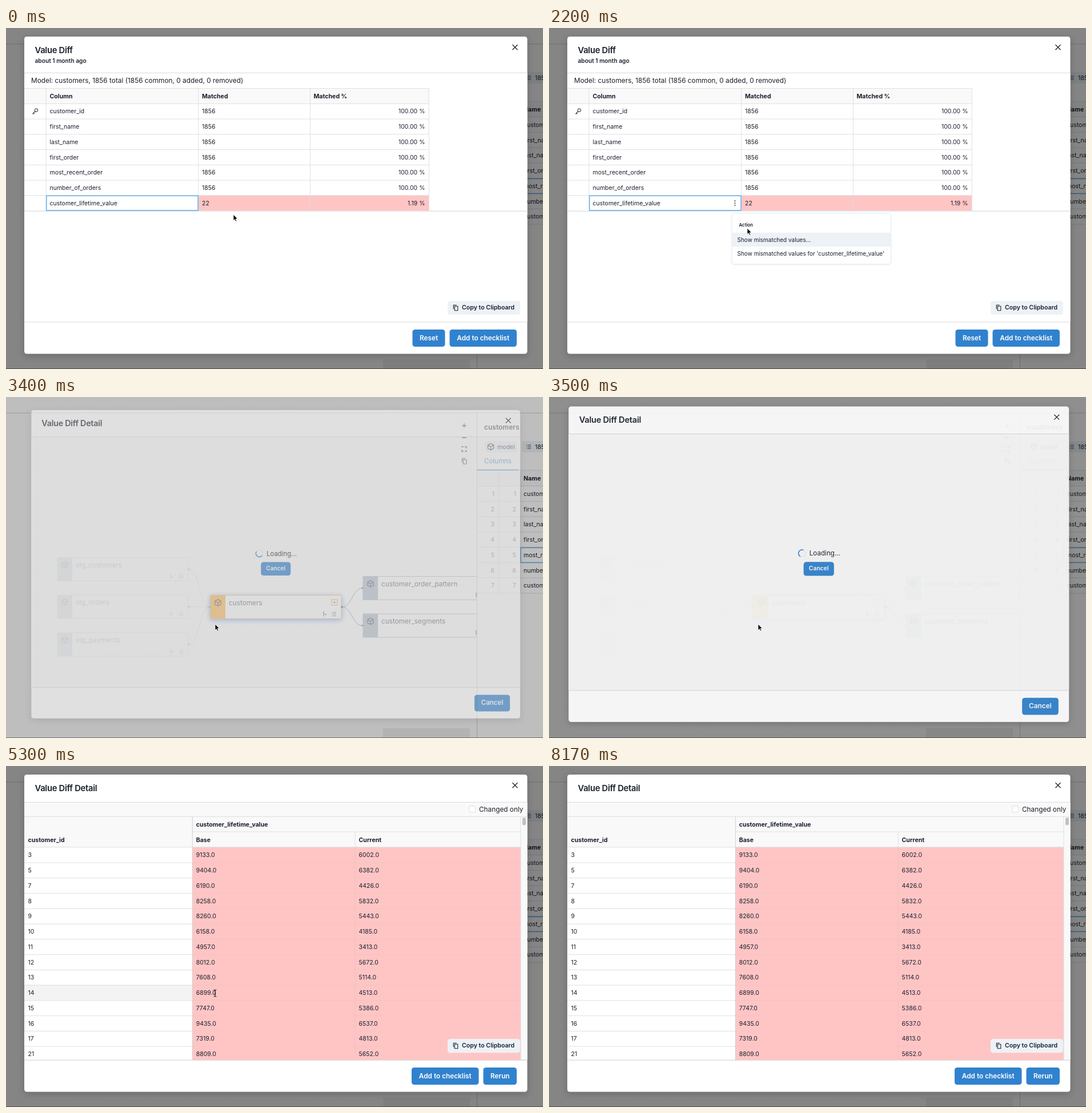
Recreate the animation shown at these times as an HTML page. Size 940 by 596 pixels, loop 8340 ms.

```html
<!DOCTYPE html>
<html lang="en">
<head>
<meta charset="utf-8">
<title>Value Diff</title>
<style>
  html, body { margin: 0; width: 100%; height: 100%; overflow: hidden; background: #fff; }
  svg { display: block; width: 940px; height: 596px; font-family: Inter, Roboto, sans-serif; }
  text { white-space: pre; }
  .semi { font-weight: 600; }
  .bold { font-weight: 700; }
  .end { text-anchor: end; }
  .mid { text-anchor: middle; }
  .title { font-weight: 600; letter-spacing: -.3px; }
  #detail { transform-origin: 472px 292px; }
  #menu { transform-origin: 320px 323px; }
</style>
</head>
<body>
<svg id="stage" viewBox="0 0 940 596"></svg>
<script>
const ROW = 26.75, LOOP = 8340;
const INK = '#1a202c', LINE = '#ddd', PINK = '#ffc5c5', BLUE = '#3182ce', FOCUS = '#66afe9';
const columns = ['customer_id', 'first_name', 'last_name', 'first_order',
  'most_recent_order', 'number_of_orders', 'customer_lifetime_value'];
const values = [
  [3, 9133, 6002], [5, 9404, 6382], [7, 6190, 4426], [8, 8258, 5832], [9, 8260, 5443],
  [10, 6158, 4185], [11, 4957, 3413], [12, 8012, 5672], [13, 7608, 5114], [14, 6899, 4513],
  [15, 7747, 5386], [16, 9435, 6537], [17, 7319, 4813], [21, 8809, 5652]];

// Drawing helpers; text is placed by its vertical centre.
const text = (x, y, s, size = 10.5, cls = '', fill = INK) =>
  `<text x="${x}" y="${y + size * .36}" font-size="${size}" class="${cls}" fill="${fill}">${s}</text>`;
const rect = (x, y, w, h, fill, more = '') =>
  `<rect x="${x}" y="${y}" width="${w}" height="${h}" fill="${fill}" ${more}/>`;
const path = (d, stroke, width = 1, more = '') =>
  `<path d="${d}" fill="none" stroke="${stroke}" stroke-width="${width}" ${more}/>`;
const at = (x, y, body) => `<g transform="translate(${x} ${y})">${body}</g>`;
const group = (id, body, more = '') => `<g id="${id}" ${more}>${body}</g>`;
const each = (list, draw) => list.map(draw).join('');
const hline = (x1, x2, y, color = LINE) => path(`M${x1} ${y}H${x2}`, color, .9);
const vline = (x, y1, y2, color = LINE) => path(`M${x} ${y1}V${y2}`, color, .9);

const button = (x, y, w, h, label, size) =>
  rect(x, y, w, h, BLUE, 'rx="4.6"') + text(x + w / 2, y + h / 2 - .7, label, size, 'semi mid', '#fff');
const copyIcon = (x, y, color) => at(x, y,
  path('M-1.5-2.5H4V5H-1.5ZM-3.5 2.5V-4.5H2', color, 1.1, 'stroke-linejoin="round"'));
const copyButton = rect(773, 477, 127, 24.3, '#edf2f7', 'rx="4.6"') +
  copyIcon(786.8, 488.8, INK) + text(798, 488.5, 'Copy to Clipboard', 10.6, 'semi');

const cube = (x, y) => at(x, y, path('M0-5.6 5-3V3L0 5.6-5 3V-3ZM-5-3 0 0 5-3M0 0V5.6', '#2d3748', 1.3));
const listIcon = (x, y) => at(x, y, path('M-2-3H4M-2 0H4M-2 3H4M-4-3h1M-4 0h1M-4 3h1', '#4a5568', 1));

function node(x, y, name, color, more = '') {
  return at(x, y, `<g ${more}>` + rect(0, 0, 229, 41, '#fff', `stroke="${color}"`) +
    rect(0, 0, 26, 41, color) + cube(13, 13) + text(32, 13, name, 11.8, '', '#2d3748') +
    path('M198 28v9M198 33h4v2', '#4a5568', 1.2) + listIcon(216, 33) + '</g>');
}

function pageView() {
  const edge = (x1, y1, x2, y2, opacity) => path(
    `M${x1} ${y1}C${(x1 + x2) / 2} ${y1} ${(x1 + x2) / 2} ${y2} ${x2} ${y2}`, '#718096', 1, `opacity="${opacity}"`) +
    `<g fill="#333" opacity="${opacity}"><circle cx="${x1}" cy="${y1}" r="1.6"/><circle cx="${x2}" cy="${y2}" r="1.6"/></g>`;
  const stages = ['stg_customers', 'stg_orders', 'stg_payments'];
  const tops = [280.5, 346, 412];
  const graph = rect(0, 0, 824, 596, 'url(#dots)') +
    each(stages, (name, i) => node(90, tops[i], name, '#a0aec0', 'opacity=".28"') +
      edge(320, tops[i] + 20.5, 357, 367, .25)) +
    node(358, 346.5, 'customers', '#ffa520', 'style="filter:drop-shadow(0 2px 5px #48f)"') +
    at(575, 359, rect(-5, -5, 10, 10, 'none', 'stroke="#ed8936"') + '<circle r="2" fill="#ed8936"/>') +
    each([['customer_order_pattern', 313.5], ['customer_segments', 379]], ([name, y]) =>
      edge(588, 367, 624, y + 20.5, 1) + node(625, y, name, '#a0aec0')) +
    at(802, 50, path('M-4 0H4M0-4V4M-4 21H4M-4 38v-1H-1M1 37H4V40M4 43V45H1M-1 45H-4V42', '#333', 1.3)) +
    copyIcon(802, 112, '#333') + rect(660, 579, 152, 17, '#f0f0f0');
  const panel = rect(824.5, 28, 116, 568, '#fff') + vline(824.5, 28, 596, '#ccc') +
    text(837, 53, 'customers', 12, 'semi') +
    rect(838, 77, 57, 20, '#edf2f7', 'rx="4"') + cube(848.5, 87) + text(860, 87, 'model', 10.6) +
    rect(903, 77, 80, 20, '#edf2f7', 'rx="4"') + listIcon(915, 87) + text(926, 87, '1856 rows', 10.6) +
    text(837, 112, 'Columns', 11.5, '', BLUE) + hline(824, 940, 128) + path('M824 127.5H898', BLUE, 1.5) +
    rect(825, 129, 115, 26.4, '#f9f9f9') + text(906, 142, 'Name', 10.6, 'bold') +
    each(columns, (name, i) => {
      const y = 169 + i * ROW;
      return hline(825, 940, y - 13.4) + text(855, y, i + 1, 10.5, 'end', '#777') +
        text(893, y, i + 1, 10.5, 'end', '#777') + text(906, y, name);
    }) +
    hline(825, 940, 343) + vline(862.5, 129, 343) + vline(900.5, 129, 343) +
    rect(900.8, 263.4, 80, 26, 'none', `stroke="${FOCUS}" stroke-width="1.5"`);
  return rect(0, 0, 940, 596, '#fff') + graph + panel + hline(0, 940, 28, '#ccc') + hline(0, 940, 595.5, '#888');
}

const dialog = (title, headerBottom, bodyFill) =>
  rect(32, 15, 880.5, 554.5, '#fff', 'rx="4.6" style="filter:drop-shadow(0 3px 6px #0003)"') +
  rect(32, headerBottom, 880.5, 514 - headerBottom, bodyFill) +
  text(50.5, 38.5, title, 14.8, 'title') +
  path('M886.5 29.3l9 9M895.5 29.3l-9 9', INK, 1.3) +
  hline(32, 912.5, headerBottom, '#d6d6d6') + hline(32, 912.5, 514, '#d6d6d6');

function diffView() {
  const last = 132 + 6 * ROW;
  return dialog('Value Diff', 78.5, '#fff') + text(50.5, 57.5, 'about 1 month ago', 10.2, 'semi') +
    text(44, 91.5, 'Model: customers, 1856 total (1856 common, 0 added, 0 removed)', 11.85) +
    rect(32, 105.5, 708, 26.5, '#f9f9f9') +
    text(76.5, 119, 'Column', 10.6, 'bold') + text(343, 119, 'Matched', 10.6, 'bold') +
    text(538.5, 119, 'Matched %', 10.6, 'bold') +
    rect(32, last, 305, ROW, '#f3f3f3', 'id="diffHover"') + rect(337, last, 403, ROW, PINK) +
    each(columns, (name, i) => {
      const y = 145.7 + i * ROW, changed = i === 6;
      return hline(32, 740, y - 13.4) + text(76.5, y, name) + text(343, y, changed ? 22 : 1856) +
        text(733.5, y, changed ? '1.19 %' : '100.00 %', 10.5, 'end');
    }) +
    each([70, 336.8, 532.5, 740.3], x => vline(x, 105.5, 319.5)) +
    hline(32, 740, 105.5) + hline(32, 912.5, 320, '#ccc') +
    rect(70.8, last + .7, 265.3, 25.6, 'none', `stroke="${FOCUS}" stroke-width="1.5"`) +
    '<circle cx="53" cy="143.7" r="2.8" fill="none" stroke="#222"/>' +
    path('M51 145.7L46.5 150.3M48 148.8l1.5 1.5', '#222', 1.2) +
    group('kebab', each([302.2, 306, 309.8], y => `<circle cx="325.5" cy="${y}" r=".95" fill="#222"/>`)) +
    copyButton + button(711.5, 527, 57, 30, 'Reset', 11.8) + button(776.5, 527, 117.5, 30, 'Add to checklist', 11.8) +
    group('menu', rect(320, 323.5, 278.7, 89.3, '#fff',
        'rx="4.6" stroke="#e2e8f0" stroke-width=".9" style="filter:drop-shadow(0 1px 1px #0001)"') +
      rect(320.4, 357.6, 278, 24.5, '#edf2f7', 'id="option"') + text(332.5, 344, 'Action', 7.9, 'semi') +
      text(329.5, 370, 'Show mismatched values...', 10) +
      text(329.5, 394.5, "Show mismatched values for 'customer_lifetime_value'", 10));
}

function detailView() {
  const loading = '<circle cx="442.5" cy="273" r="6.3" fill="none" stroke="#e4eaf1" stroke-width="1.5"/>' +
    path('M446.95 268.55A6.3 6.3 0 0 1 438.05 277.45', BLUE, 1.6, 'id="spinner"') +
    text(455.7, 273, 'Loading...', 11.7) + button(445.5, 288.3, 53.5, 24.4, 'Cancel', 10.45) +
    button(830, 527, 64, 30, 'Cancel', 11.9);
  const rows = each(values, ([id, base, current], i) => {
    const y = 155.7 + i * ROW;
    return text(38.5, y, id) + text(332.7, y, base + '.0') + text(617.5, y, current + '.0') +
      hline(32, 326, y + 13.4) + hline(326, 901, y + 13.4, '#efc4c4');
  });
  const result = rect(811, 70.3, 10.6, 10.6, '#fff', 'rx="1.5" stroke="#e2e8f0" stroke-width="1.4"') +
    text(828, 76, 'Changed only', 11.8) +
    `<g clip-path="url(#tableClip)">` + rect(32, 142, 294, 372, '#fff') +
    rect(32, 0, 294, ROW, '#f3f3f3', 'id="rowHover"') + rect(326.5, 142, 574.5, 372, PINK) + rows + '</g>' +
    hline(32, 912.5, 88.5) + hline(326, 901, 115) + hline(32, 901, 141.8) +
    vline(326.3, 88.5, 514, '#ccc') + vline(611, 115, 142) + vline(611, 142, 514, '#f2bcbc') + vline(901, 88.5, 514) +
    rect(904, 90, 6, 13.5, '#c1c1c1', 'rx="3"') +
    text(38.5, 129, 'customer_id', 10.6, 'bold') + text(332.7, 102, 'customer_lifetime_value', 10.6, 'bold') +
    text(332.7, 129, 'Base', 10.6, 'bold') + text(617.5, 129, 'Current', 10.6, 'bold') +
    copyButton + hline(32, 912.5, 514, '#d6d6d6') +
    button(710, 527, 117.5, 30, 'Add to checklist', 11.8) + button(835.5, 527, 58.5, 30, 'Rerun', 11.8);
  return dialog('Value Diff Detail', 63.3, '#f9f9f9') + group('loading', loading) + group('result', result);
}

const cursors =
  '<path id="arrow" d="M0 0V10.6L2.4 8.4 4 12 5.8 11.2 4.2 7.7H7.5Z" fill="#000" stroke="#fff" stroke-width=".8"/>' +
  '<path id="hand" d="M-1 .7Q0-.7 1 .7V4.6L2 4.2 3 4.9 4 4.6 5 5.3Q6 5 6.2 6.3V8.6L5 12H-1L-3.6 7.6Q-3.4 6-1 7.6Z" fill="#fff" stroke="#000" stroke-width=".9"/>' +
  group('beam', path('M-2.5-6Q0-6 0-4.5Q0-6 2.5-6M0-4.5V4.5M-2.5 6Q0 6 0 4.5Q0 6 2.5 6M-1.2 1.5H1.2', '#222', 1.1));

document.getElementById('stage').innerHTML =
  '<defs><pattern id="dots" width="15.2" height="15.2" patternUnits="userSpaceOnUse"><circle cx="7" cy="7" r=".6" fill="#ddd"/></pattern>' +
  '<clipPath id="tableClip"><rect x="32" y="142" width="869" height="372"/></clipPath></defs>' +
  pageView() + rect(0, 0, 940, 596, '#000', 'id="shade"') +
  group('diff', diffView()) + group('detail', detailView()) + group('pointer', cursors);

const el = {};
document.querySelectorAll('[id]').forEach(e => el[e.id] = e);
const show = (id, on) => el[id].style.display = on ? '' : 'none';

// Pointer moves: start, end, from x y, to x y.
const moves = [
  [0, 700, 398, 326, 328, 303],
  [1750, 2650, 328, 303, 366, 397],
  [5600, 6400, 366, 397, 376, 421],
  [7100, 8000, 376, 421, 534, 12]];

function pointerAt(t) {
  const [start, end, x1, y1, x2, y2] = moves.filter(m => t >= m[0]).pop();
  const u = Math.min(1, (t - start) / (end - start)), k = u * u * (3 - 2 * u);
  return [x1 + (x2 - x1) * k, y1 + (y2 - y1) * k];
}

function render(t) {
  const [x, y] = pointerAt(t);
  const first = t < 3400, loaded = t >= 4300, gone = t >= 8170;

  const enter = first ? 1 : 1 - (1 - Math.min(1, (t - 3333) / 300)) ** 3;
  el.shade.setAttribute('opacity', .48 * enter);
  el.detail.style.opacity = enter;
  el.detail.style.transform = `scale(${.94 + .06 * enter})`;
  show('diff', first);
  show('detail', !first);
  show('loading', !loaded);
  show('result', loaded);
  el.spinner.setAttribute('transform', `rotate(${(t - 4200) * .8} 442.5 273)`);

  const inCell = x < 337 && y < 320;
  show('kebab', inCell || t >= 1500);
  show('diffHover', inCell);
  show('menu', t >= 1500);
  el.menu.style.opacity = t < 1600 ? .6 : 1;
  el.menu.style.transform = `scale(${t < 1600 ? .95 : 1})`;
  el.option.setAttribute('y', y > 382 ? 382.1 : 357.6);
  el.option.setAttribute('fill', t >= 3200 ? '#e2e8f0' : '#edf2f7');

  const row = Math.floor((y - 142) / ROW);
  show('rowHover', row >= 0 && !gone);
  el.rowHover.setAttribute('y', 142 + row * ROW);

  const beam = loaded && y > 142;
  const hand = first && (x < 334 && y < 316 || y > 358);
  show('pointer', !gone);
  show('beam', beam);
  show('hand', hand);
  show('arrow', !beam && !hand);
  el.pointer.setAttribute('transform', `translate(${x} ${y})`);
}

function tick() {
  const t = performance.now() % LOOP;
  render(t >= 8170 ? 8170 : Math.min(8000, Math.floor(t / 100) * 100));
  requestAnimationFrame(tick);
}
tick();
</script>
</body>
</html>
```
